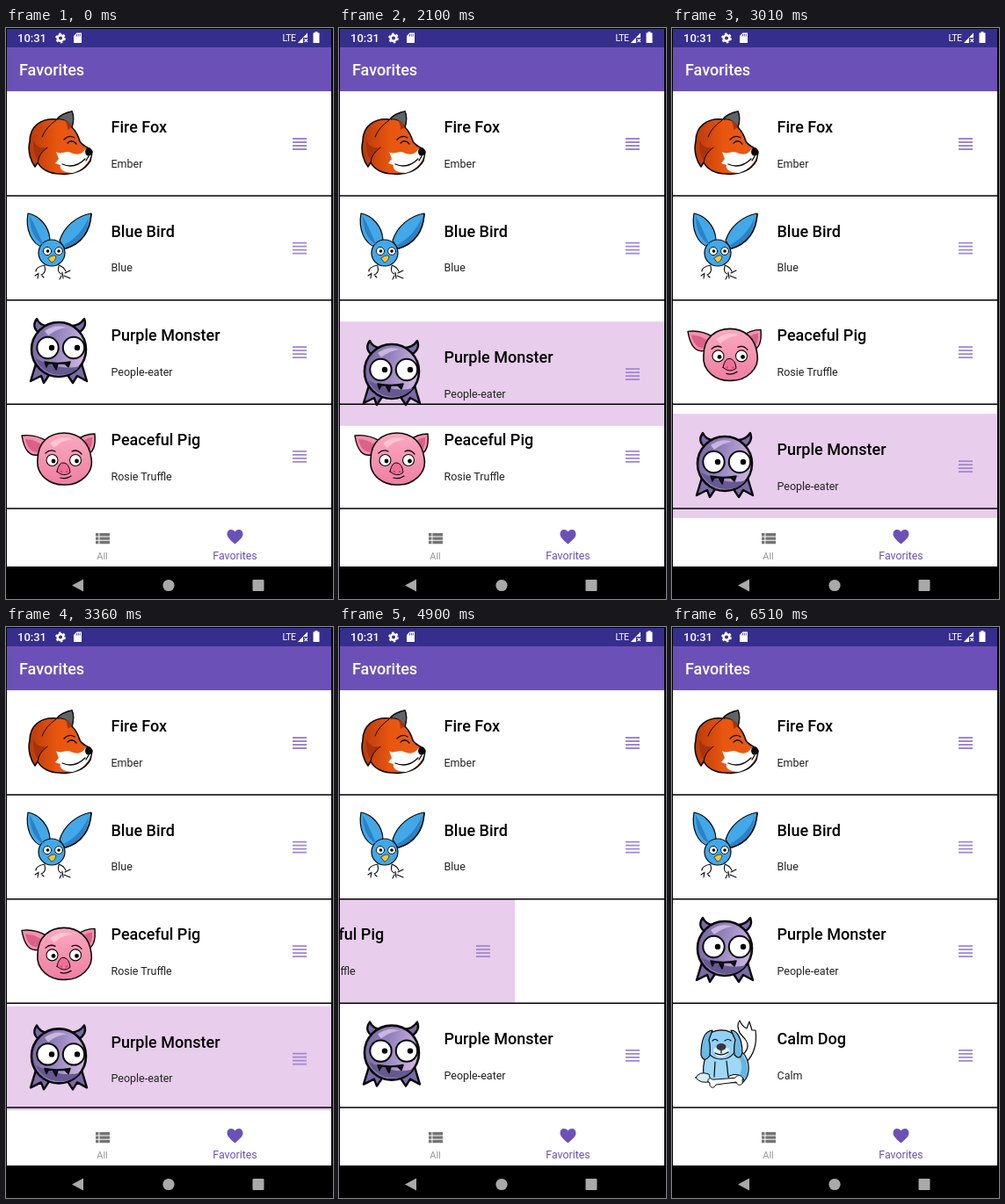
Animation of 372 by 650 pixels, one loop 6.58 s. Source, as an HTML page:

```html
<!DOCTYPE html>
<html lang="en">
<head>
<meta charset="utf-8">
<title>Favorites</title>
<style>
  html, body { margin: 0; width: 100%; height: 100%; overflow: hidden; background: #000; }
  svg { display: block; width: 372px; height: 650px; font-family: Roboto, sans-serif; }
  .name { font-size: 18px; font-weight: 500; fill: #000; }
  .nick { font-size: 12.5px; fill: #222; }
  .ink { stroke: #080808; stroke-linejoin: round; stroke-linecap: round; }
  .line { fill: none; }
</style>
</head>
<body>
<svg viewBox="0 0 372 650" xmlns="http://www.w3.org/2000/svg">
  <defs>
    <clipPath id="listArea"><rect x="1" y="72" width="369" height="486"/></clipPath>

    <linearGradient id="foxFur"><stop stop-color="#b93a0b"/><stop offset=".45" stop-color="#e9560f"/><stop offset="1" stop-color="#e85b16"/></linearGradient>
    <linearGradient id="monsterSkin" x2="1" y2=".25"><stop stop-color="#70639b"/><stop offset=".5" stop-color="#9482bd"/><stop offset="1" stop-color="#c9b0df"/></linearGradient>
    <linearGradient id="pigSkin" x2="0" y2="1"><stop stop-color="#fba9c0"/><stop offset="1" stop-color="#ee7fa2"/></linearGradient>

    <g id="fox" transform="translate(0 -72)">
      <path class="ink" stroke-width="1.6" fill="url(#foxFur)" d="M58 104C40 102 27 112 27 129C24 141 29 153 33 158L36 153C40 161 50 166 61 166C76 168 90 162 96 151L98 141C97 136 88 136 84 129C82 122 79 117 75 113C77 106 77 99 75 95C68 96 60 100 58 104Z"/>
      <path class="ink" stroke-width="1" fill="#606368" d="M75 95C68 97 62 99 59 104C66 103 72 107 75 113C77 106 77 100 75 95Z"/>
      <path fill="#a9320a" d="M67 105Q73 107 75 113L70 116Q70 109 67 105ZM31 128Q30 143 37 152Q39 143 45 136Q36 138 31 128Z"/>
      <path class="ink line" stroke-width="1" d="M57 105Q45 113 41 124M36 153Q37 143 47 136"/>
      <path fill="#fff" d="M57 141C63 145 68 139 74 142C81 145 87 144 90 138L97 144C95 153 87 162 76 165C67 165 60 161 62 156L56 154L60 149Z"/>
      <path class="ink line" stroke-width="1.3" d="M70 131Q75 126 80 132M66 127Q72 121 78 125M64 155Q78 161 90 149M94 146L91 151"/>
      <ellipse cx="94" cy="141" rx="4" ry="4.7" fill="#090909"/>
    </g>

    <g id="bird" transform="translate(0 -190.6)">
      <g class="ink" stroke-width="1.2" fill="#42a8e8">
        <path d="M25 211C22 228 28 246 43 250L50 241C49 225 37 213 25 211Z"/>
        <path d="M97 211C80 214 66 226 61 242L67 251C84 248 96 232 97 211Z"/>
        <circle cx="52" cy="256" r="15"/>
      </g>
      <path fill="#2b82c6" d="M27 214C27 229 32 240 43 248C37 235 33 224 27 214ZM94 216C88 230 79 240 66 247L68 250C84 246 93 233 94 216Z"/>
      <path class="ink line" stroke-width="1.6" d="M97 212Q95 242 68 251"/>
      <g class="ink" stroke-width=".9" fill="#fff"><circle cx="47" cy="254" r="4.6"/><circle cx="60" cy="254" r="4.4"/></g>
      <circle cx="47.5" cy="254" r="1.8"/><circle cx="60" cy="254" r="1.8"/>
      <path class="ink" stroke-width=".6" fill="#f4c430" d="M48 262Q54 257 57 260Q56 266 52 267Z"/>
      <path class="ink line" stroke-width="1.1" d="M44 270Q34 272 34 277M44 271Q46 279 40 281M37 279L36 285M41 282L43 284M33 282L36 280M60 270Q66 272 68 277M60 271Q58 278 63 280M64 278L65 285M67 279L73 276M66 282L73 285M63 282L61 286"/>
    </g>

    <g id="monster" transform="translate(0 -309.2)">
      <g class="ink" stroke-width="2.4" fill="#7a6aa6">
        <path d="M34 382L28 402L40 396L43 404L51 392ZM86 382L92 402L81 396L76 404L68 392Z"/>
        <path d="M39 348Q28 341 35 331Q39 340 50 339ZM81 348Q93 341 89 331Q83 340 72 339Z"/>
      </g>
      <circle class="ink" stroke-width="2.6" fill="url(#monsterSkin)" cx="60" cy="366" r="31"/>
      <path fill="#c8b6e0" d="M44 345Q56 336 69 341Q58 342 48 350Z"/>
      <path fill="#665890" d="M33 376Q42 394 61 395Q77 395 84 385Q63 391 33 376Z"/>
      <g class="ink" stroke-width="2" fill="#fff"><circle cx="47.5" cy="364" r="12.2"/><circle cx="77" cy="364" r="12.2"/></g>
      <circle cx="52" cy="364" r="3.2"/><circle cx="81" cy="364" r="3.2"/>
      <path class="ink" stroke-width="1.5" fill="#15101f" d="M44 380Q58 383 73 380L71 386L67 382L59 382L57 389L53 382L48 382L46 386Z"/>
    </g>

    <g id="pig" transform="translate(0 -427.8)">
      <g class="ink" stroke-width="1.4" fill="#f78fae">
        <path d="M18 464Q33 462 46 470L37 486Q22 489 18 464ZM101 462Q89 462 79 470L91 486Q103 483 101 462Z"/>
      </g>
      <path fill="#da6189" d="M22 468Q32 468 40 474L35 483Q25 482 22 468ZM98 466Q90 467 84 473L92 482Q99 478 98 466Z"/>
      <path class="ink" stroke-width="1.6" fill="url(#pigSkin)" d="M36 491C36 471 50 461 66 461C83 461 95 472 97 490C100 507 84 520 68 520C50 521 34 509 36 491Z"/>
      <path fill="#ffc3d1" d="M50 473Q61 463 76 468Q62 470 55 478Z"/>
      <g class="ink" stroke-width="1.1" fill="#fff"><circle cx="52.5" cy="492" r="6.5"/><circle cx="79" cy="492" r="6.5"/></g>
      <circle cx="54" cy="493" r="2.4"/><circle cx="80.5" cy="493" r="2.4"/>
      <path class="ink" stroke-width="1" fill="#ef6f96" d="M58 505Q60 494 66 495Q72 496 73 506Q66 512 58 505Z"/>
      <path class="ink line" stroke-width="1.3" d="M45 484Q50 479 56 482M75 482Q81 479 86 485M62 512Q68 514 74 510"/>
      <path class="line" stroke="#a83d62" stroke-width="1.3" d="M63 504v2M69 504v2"/>
    </g>

    <g id="dog" transform="translate(0 -427.8)">
      <path class="ink" stroke-width="1.2" fill="#fff" d="M78 489Q91 479 83 469L77 462Q73 453 77 448Q80 455 85 457L88 449L91 459L95 459Q98 482 84 496Z"/>
      <path class="ink" stroke-width="1.2" fill="#9fd8f7" d="M40 485C34 499 34 513 41 518L80 519C92 508 88 486 75 482Z"/>
      <path fill="#65b5e2" d="M74 487Q84 500 74 516L84 513Q90 495 77 485Z"/>
      <path class="ink" stroke-width="1.2" fill="#92d1f5" d="M39 469C42 456 69 455 73 469C75 483 68 492 56 492C44 492 37 483 39 469Z"/>
      <path class="ink" stroke-width="1.2" fill="#6db9e5" d="M46 459C35 460 33 475 33 487Q36 497 43 488Q44 477 42 470ZM67 459C77 459 80 475 80 485Q77 494 71 487Q70 477 72 470Z"/>
      <path fill="#d8f2ff" d="M47 481Q56 473 66 481Q62 490 56 490Q49 490 47 481Z"/>
      <ellipse cx="56" cy="478" rx="5.5" ry="4" fill="#3c3338"/>
      <path class="ink line" stroke-width="1.2" d="M46 471Q49 468 52 471M60 471Q64 468 67 471M56 482v3M49 485Q56 489 64 484M49 495L48 512M62 494L64 512"/>
      <path class="ink" stroke-width="1" fill="#d5effc" d="M27 513Q31 505 42 509L44 517Q33 521 27 513ZM65 511Q76 506 82 515Q76 519 65 516Z"/>
      <path class="ink" stroke-width="1" fill="#fff" d="M46 515C41 511 39 518 43 519C42 525 48 526 50 521L73 518C75 524 82 521 80 516C82 511 75 508 72 513Z"/>
    </g>
  </defs>

  <rect width="372" height="650"/>
  <rect x="1" y="72" width="369" height="541" fill="#fff"/>

  <g clip-path="url(#listArea)">
    <g id="rows"></g>
    <path id="dividers" stroke="#000" stroke-width="1.5"/>
  </g>

  <rect x="1" y="1" width="369" height="21" fill="#352e8d"/>
  <rect x="1" y="22" width="369" height="50" fill="#6b51b7"/>
  <text x="15" y="54" font-size="18" font-weight="500" fill="#fff">Favorites</text>

  <g fill="#fff">
    <text x="13" y="16" font-size="13" font-weight="500">10:31</text>
    <circle cx="62" cy="11.5" r="3.3" fill="none" stroke="#fff" stroke-width="2.6"/>
    <circle cx="62" cy="11.5" r="5" fill="none" stroke="#fff" stroke-width="1.8" stroke-dasharray="2.6 2.636"/>
    <path d="M80.5 5.5H86V17H77V9Z"/>
    <path d="M80.5 7v2.5M82.4 7v2.5M84.3 7v2.5" stroke="#352e8d" stroke-width=".8"/>
    <text x="314.5" y="15" font-size="10.5" letter-spacing="-.5">LTE</text>
    <path d="M343 5.5V11H338V17H332Z"/>
    <path d="M343 5.5V11H338V17H332Z" opacity=".3" transform="translate(0 .2)"/>
    <path d="M339.5 12.5l3.5 3.5m0-3.5l-3.5 3.5" stroke="#fff" stroke-width="1.1"/>
    <path d="M351.5 5.5v-1.2h3v1.2H356.5V17H349.5V5.5Z"/>
  </g>

  <path fill="#747474" d="M102 575h3.4v3.4H102zM106.4 575H118v3.4h-11.6zM102 579.4h3.4v3.4H102zM106.4 579.4H118v3.4h-11.6zM102 583.8h3.4v3.4H102zM106.4 583.8H118v3.4h-11.6z"/>
  <text x="109.5" y="604.5" font-size="11" text-anchor="middle" fill="#969696">All</text>
  <path fill="#6b51b7" d="M260.5 587.5C254 581.8 251.5 579.5 251.5 576C251.5 570.5 257.5 569.5 260.5 573.4C263.500 569.5 269.500 570.5 269.500 576C269.500 579.5 267 581.8 260.500 587.5Z"/>
  <text x="260.5" y="604.7" font-size="12.4" text-anchor="middle" fill="#6b51b7">Favorites</text>

  <g fill="#a9a9a9">
    <path d="M75 634.5L88 627.5V641.5Z"/>
    <circle cx="185" cy="634.5" r="6.6"/>
    <rect x="280.500" y="628" width="13" height="13" rx="1"/>
  </g>
</svg>

<script>
const LOOP = 6580, STEP = 70;
const TOP = 72, PITCH = 118.6;

// Key points as [time, value]
const DRAG = [[1750, 0], [2100, 25], [2730, 119], [2940, 130], [3220, 130], [3430, PITCH]];
const SWIPE = [[4550, 0], [4900, -170], [5180, -372]];
const SWAP = 2730, CLOSE_GAP = 5300, SLIDE = 250;

const animals = [
  { id: 'fox', name: 'Fire Fox', nick: 'Ember' },
  { id: 'bird', name: 'Blue Bird', nick: 'Blue' },
  { id: 'dog', name: 'Calm Dog', nick: 'Calm' },
  { id: 'pig', name: 'Peaceful Pig', nick: 'Rosie Truffle' },
  { id: 'monster', name: 'Purple Monster', nick: 'People-eater' }
];

const rowMarkup = ({ id, name, nick }) => `
  <g id="row-${id}">
    <rect x="0" width="370" height="${PITCH}" fill="#fff"/>
    <use href="#${id}"/>
    <text class="name" x="119.5" y="47.3">${name}</text>
    <text class="nick" x="119.5" y="86.8">${nick}</text>
    <path d="M326 54h16M326 58h16M326 62h16M326 66h16" stroke="#9f86d3" stroke-width="1.8"/>
  </g>`;

const byId = id => document.getElementById(id);
byId('rows').innerHTML = animals.map(rowMarkup).join('');
byId('dividers').setAttribute('d',
  [1, 2, 3, 4].map(i => `M0 ${TOP + PITCH * i + 0.5}H370`).join(''));

function track(keys, t) {
  if (t <= keys[0][0]) return keys[0][1];
  for (let i = 1; i < keys.length; i++) {
    const [t0, v0] = keys[i - 1], [t1, v1] = keys[i];
    if (t < t1) return v0 + (v1 - v0) * (t - t0) / (t1 - t0);
  }
  return keys[keys.length - 1][1];
}

function slide(start, t) {
  const p = Math.min(1, Math.max(0, (t - start) / SLIDE));
  return 0.5 - Math.cos(p * Math.PI) / 2;
}

const during = (keys, t) => t >= keys[0][0] && t < keys[keys.length - 1][0];

function place(id, slot, dx = 0, dy = 0, held = false) {
  const row = byId('row-' + id);
  row.setAttribute('transform', `translate(${dx} ${TOP + PITCH * slot + dy})`);
  row.firstElementChild.setAttribute('fill', held ? '#e8cdec' : '#fff');
}

function render(t) {
  const closed = slide(CLOSE_GAP, t);
  place('fox', 0);
  place('bird', 1);
  place('dog', 4 - closed);
  place('pig', 3 - slide(SWAP, t), track(SWIPE, t), 0, during(SWIPE, t));
  place('monster', 2 - closed, 0, track(DRAG, t), during(DRAG, t));
}

const began = performance.now();
function tick() {
  const t = (performance.now() - began) % LOOP;
  render(Math.floor(t / STEP) * STEP);
  requestAnimationFrame(tick);
}
tick();
</script>
</body>
</html>
```
